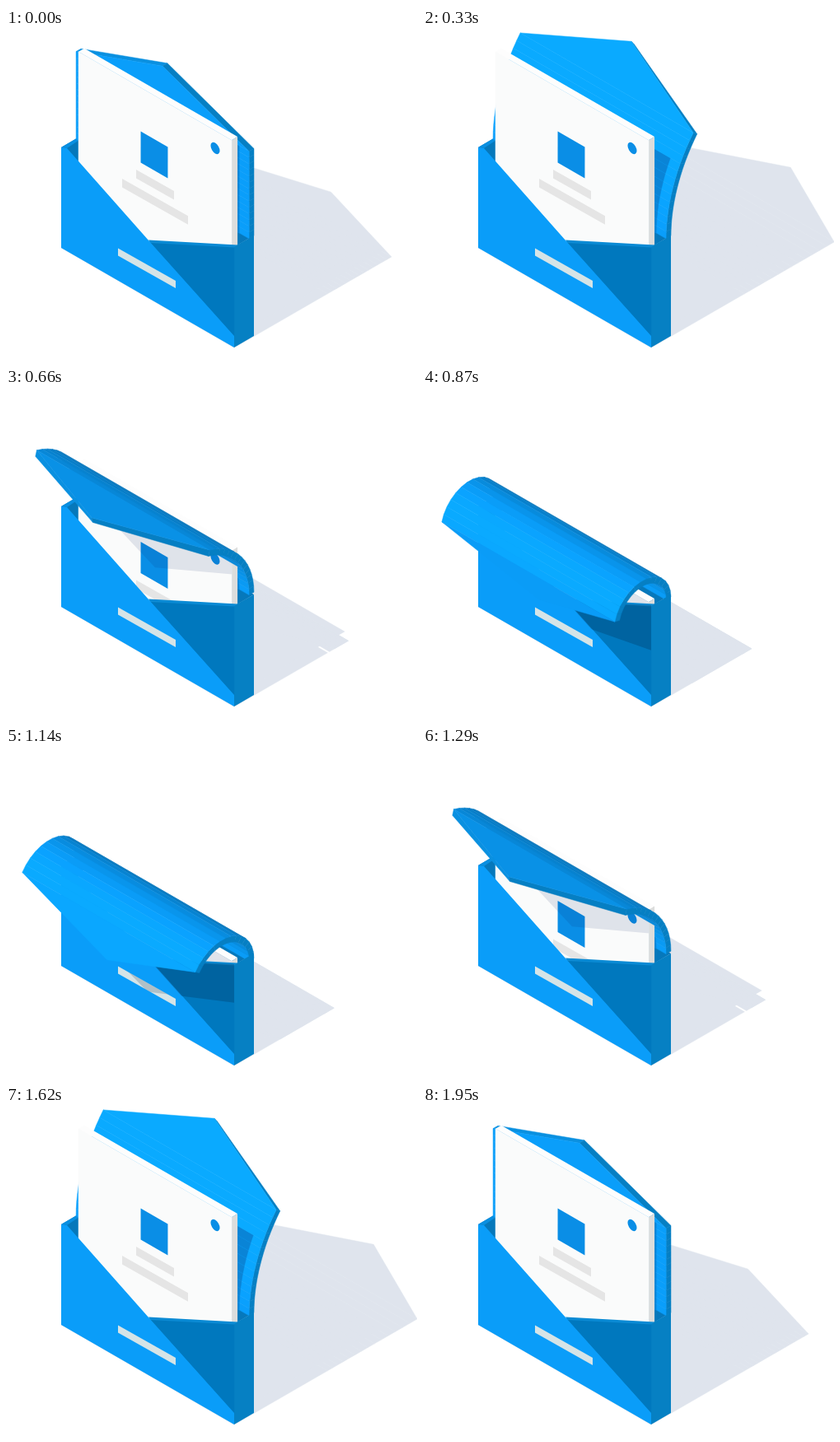
Write an HTML page that moves like this. It is 499 px wide and 402 px high and loops after 1980 ms.

```html
<!DOCTYPE html>
<html lang="en">
<head>
<meta charset="utf-8">
<title>Envelope</title>
<style>
html, body { margin: 0; width: 100%; height: 100%; overflow: hidden; background: #fff; }
svg { display: block; width: 499px; height: 402px; }
</style>
</head>
<body>
<svg id="stage" viewBox="0 0 499 402" xmlns="http://www.w3.org/2000/svg"></svg>
<script>
const stage = document.getElementById('stage');

// Envelope and flap sizes: width, depth, height, flap thickness, flap side and peak lengths
const W = 242.5, D = 27.7, H = 122, T = 6.8, SIDE = 106, PEAK = 149;
const SEGMENTS = 14;
const CAST = 0.846; // shadow length per unit of height
const LETTER = { left: 13.9, right: 228.7, front: 10.4, back: 18.5, top: 240 };
const STEP = 30, FRAMES = 66;

// Bend of the flap in degrees (positive leans forward): frame, angle, slope
const BEND = [[0, 0, 0], [13, -41, 0], [18.5, 6, 17.5], [22, 74, 18], [27, 147, 11], [32.5, 182, 0]];

const iso = (u, d, h) => [67 + 0.866 * (u + d), 267 + 0.5 * (u - d) - h];
const ground = (u, d, h) => iso(u, d + CAST * h, 0);
const str = pts => pts.map(p => p[0].toFixed(2) + ',' + p[1].toFixed(2)).join(' ');
const poly = (pts, fill, extra = '') => `<polygon points="${str(pts)}" fill="${fill}" ${extra}/>`;
const solid = (pts, fill) => poly(pts, fill, `stroke="${fill}" stroke-width=".5" stroke-linejoin="round"`);
const clip = (id, pts) => `<clipPath id="${id}"><polygon points="${str(pts)}"/></clipPath>`;
const smooth = x => { x = Math.min(1, Math.max(0, x)); return x * x * (3 - 2 * x); };
const clockwise = pts => pts.reduce((sum, [x, y], i) => {
  const [nx, ny] = pts[(i + 1) % pts.length];
  return sum + x * ny - nx * y;
}, 0) > 0;

function bendAt(f) {
  let i = 0;
  while (i < BEND.length - 2 && f > BEND[i + 1][0]) i++;
  const [f0, a, m0] = BEND[i], [f1, b, m1] = BEND[i + 1];
  const n = f1 - f0, x = (f - f0) / n;
  return a + (b - a) * smooth(x) + n * (m0 * x * (1 - x) ** 2 - m1 * x * x * (1 - x));
}

// Surface colour from its front and up components
function shade(front, up) {
  const t = Math.max(0, 0.766 * front + 0.643 * up) / 0.766;
  const mix = (a, b, top) => Math.round(Math.min(top, a + (b - a) * t));
  return `rgb(${mix(6, 10, 10)},${mix(116, 158, 170)},${mix(186, 250, 255)})`;
}

// Rows across the flap: a curved sheet that ends in one flat pointed tip
function makeFlap(degrees) {
  const bend = Math.abs(degrees) < 0.01 ? 1e-4 : degrees * Math.PI / 180;
  const r = SIDE / bend * (1 + 0.09 * Math.max(0, -degrees) / 37);
  const base = H + 6 * Math.sin(2 * Math.max(0, bend));
  const row = s => {
    const a = bend * s / SIDE;
    const inset = Math.max(0, (s - SIDE) / (PEAK - SIDE)) * W / 2;
    const at = off => [D - T / 2 - r * (1 - Math.cos(a)) + off * Math.cos(a), base + r * Math.sin(a) + off * Math.sin(a)];
    return { a, l: inset, r: W - inset, inner: at(-T / 2), outer: at(T / 2) };
  };
  const rows = [];
  for (let i = 0; i <= SEGMENTS; i++) rows.push(row(SIDE * i / SEGMENTS));
  return rows.concat(row(PEAK));
}

function strip(p, q, letterTop) {
  const a = p.a * 0.75 + q.a * 0.25, c = Math.cos(a), s = Math.sin(a);
  const face = k => [iso(p.l, ...p[k]), iso(p.r, ...p[k]), iso(q.r, ...q[k]), iso(q.l, ...q[k])];
  const edge = e => [iso(p[e], ...p.inner), iso(p[e], ...p.outer), iso(q[e], ...q.outer), iso(q[e], ...q.inner)];
  const side = (pts, fill, turn) => clockwise(pts) === turn ? solid(pts, fill) : '';
  const inner = side(face('inner'), shade(c, -s), false);
  let out = side(edge('l'), '#0a90e0', true) + side(edge('r'), '#067fc3', false)
    + inner + side(face('outer'), shade(-c, s), true);
  // Shadow of the letter on the inside
  const [d, h] = q.inner;
  if (inner && d > LETTER.back && h < letterTop - (d - LETTER.back) / CAST) {
    const l = Math.max(p.l, LETTER.left), e = Math.min(q.r, LETTER.right);
    out += solid([iso(l, ...p.inner), iso(e, ...p.inner), iso(e, ...q.inner), iso(l, ...q.inner)], '#0a84d6');
  }
  return out;
}

// Outline of the flap's shadow on an upright plane at depth d
function castOn(rows, d) {
  const near = rows.filter(w => w.outer[0] < d);
  const drop = (w, u) => iso(u, d, w.outer[1] - (d - w.outer[0]) / CAST);
  return near.map(w => drop(w, w.l)).concat(near.reverse().map(w => drop(w, w.r)));
}

function groundShadow(rows, top) {
  const fill = '#dfe4ed', { left, right, front, back } = LETTER;
  let out = solid([ground(0, 0, 0), ground(W, 0, 0), ground(W, D, H), ground(0, D, H)], fill);
  out += solid([ground(left, front, 0), ground(right, front, 0), ground(right, back, top), ground(left, back, top)], fill);
  for (let i = 1; i < rows.length; i++) {
    const p = rows[i - 1], q = rows[i];
    out += solid([ground(p.l, ...p.outer), ground(p.r, ...p.outer), ground(q.r, ...q.outer), ground(q.l, ...q.outer)], fill);
  }
  return out;
}

function letter(rows, drop) {
  const { left, right, front, back } = LETTER, top = LETTER.top - drop, low = 15;
  const face = [iso(left, front, top), iso(right, front, top), iso(right, front, low), iso(left, front, low)];
  const bar = (x, y, w) => poly([[x, y], [x + w, y + w * 0.565], [x + w, y + w * 0.565 + 10.5], [x, y + 10.5]], '#e5e5e5');
  return poly([face[0], iso(left, back, top), iso(right, back, top), face[1]], '#fdfdfd')
    + poly([face[1], iso(right, back, top), iso(right, back, low), face[2]], '#dcdddc')
    + solid(face, '#fafbfb') + clip('sheet', face)
    + `<g clip-path="url(#sheet)"><g transform="translate(0 ${drop.toFixed(2)})">`
    + bar(158, 172, 46) + bar(141, 183, 80)
    + '<rect x="-19" y="-19" width="38" height="38" fill="#0a8ee6" transform="matrix(.866 .5 0 1 180 154)"/>'
    + '<circle r="6.4" fill="#0a8ee6" transform="matrix(.866 .5 0 1 254 146)"/></g>'
    + poly(castOn(rows, front), '#001e5a', 'opacity=".11"') + '</g>';
}

function pocket(rows) {
  const front = [[67, 145], [74, 146], [174, 259], [277, 374], [277, 388], [67, 267]];
  const fold = [[174, 260], [277, 265], [277, 375]];
  const label = [[136, 267.5], [206, 307], [206, 316], [136, 276.5]];
  const cast = castOn(rows, 0);
  const dim = (id, area, amount) => clip(id, area)
    + `<g clip-path="url(#${id})">${poly(cast, '#001e3c', `opacity="${amount}"`)}</g>`;
  return poly([[277, 265.5], [301, 252], [301, 374], [277, 388]], '#0680c3')
    + solid(fold, '#0078be')
    + poly([[173, 257.5], [281, 263.5], [277, 266.5], [175, 261]], '#0a8ad4')
    + poly(front, '#0a9df9') + poly(label, '#d5e4e7')
    + dim('fold', fold, 0.23) + dim('label', label, 0.18);
}

function draw(frame) {
  const f = Math.min(frame, FRAMES - 1 - frame);
  const rows = makeFlap(bendAt(f));
  const drop = 125 * smooth((f - 18.2) / 7.6), top = LETTER.top - drop;
  let behind = '', before = '', curled = '';
  for (let i = 1; i < rows.length; i++) {
    const p = rows[i - 1], q = rows[i], piece = strip(p, q, top);
    if ((p.a + q.a) / 2 > Math.PI * 1.25) curled = piece + curled;
    else if ((q.inner[0] + q.outer[0]) / 2 > 14) behind += piece;
    else before += piece;
  }
  stage.innerHTML = groundShadow(rows, top)
    + poly([[67, 145], [91, 131], [301, 252], [277, 266], [174, 262]], '#0678bb')
    + poly([[67, 145], [89, 132], [89, 136], [74, 146]], '#0a8fe0')
    + behind + letter(rows, drop) + pocket(rows) + curled + before;
}

const start = performance.now();
let shown = -1;
function tick() {
  const frame = Math.floor((performance.now() - start) / STEP) % FRAMES;
  if (frame !== shown) draw(shown = frame);
  requestAnimationFrame(tick);
}
tick();
</script>
</body>
</html>
```
